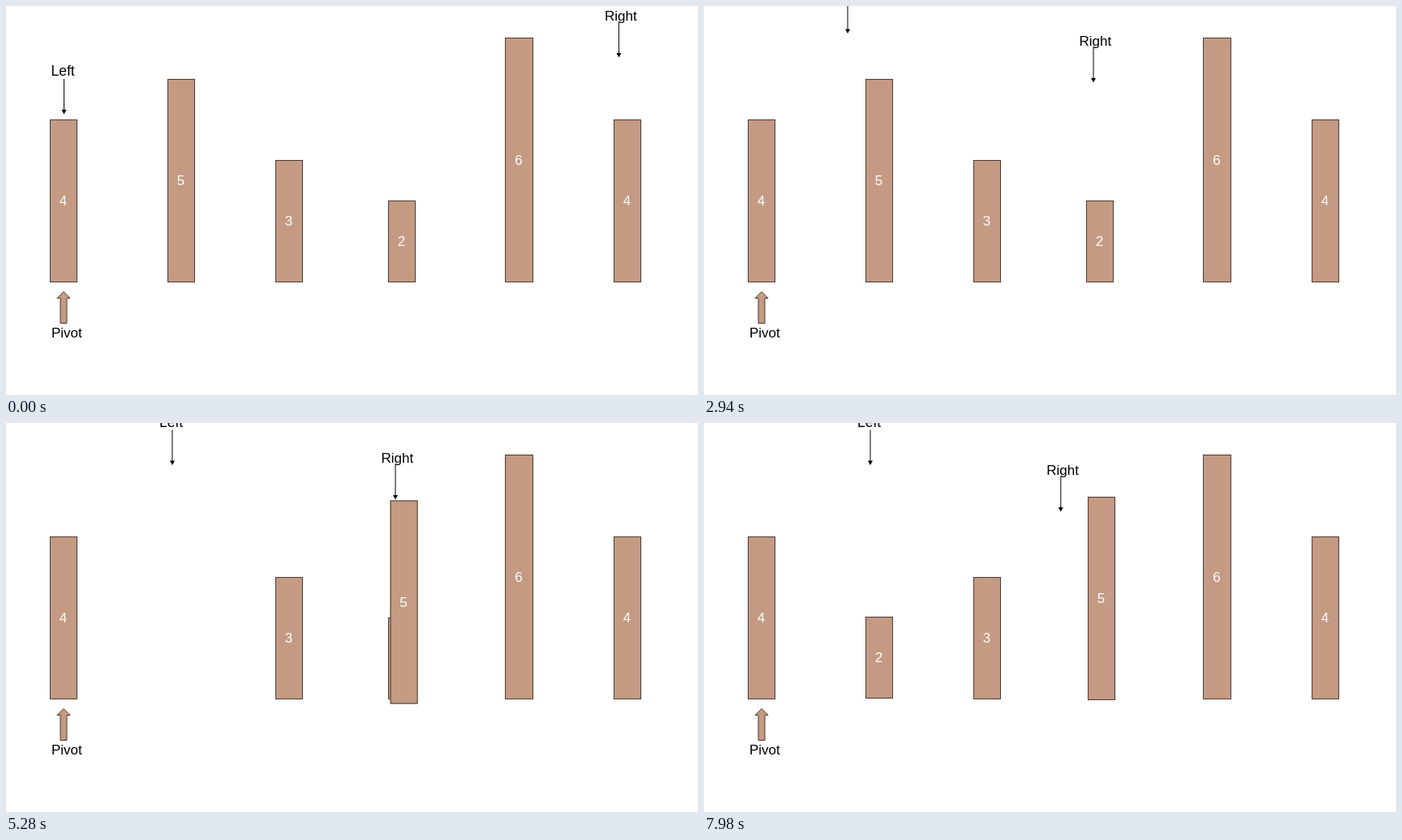
These frames come from a looping animation (853 px wide and 480 px high, 8000 ms). An HTML page with a canvas:

```html
<!DOCTYPE html>
<html lang="en">
<head>
<meta charset="utf-8">
<title>Partition step</title>
<style>
  html, body { margin: 0; width: 100%; height: 100%; overflow: hidden; background: #fff; }
  canvas { display: block; }
</style>
</head>
<body>
<canvas id="stage" width="853" height="480"></canvas>
<script>
const ctx = document.getElementById('stage').getContext('2d');
const LOOP = 8000, STEP = 60;
const FILL = '#c49a83', EDGE = '#4a3a34', INK = '#000';
const FONT = '"Liberation Sans", Arial, sans-serif';

const ease = u => u < 0.5 ? 0.5 * (2 * u) ** 2.7 : 1 - 0.5 * (2 - 2 * u) ** 2.7;

// Offset along a cubic curve from (0,0), eased by arc length.
function move(start, duration, x1, y1, x2, y2, x3, y3) {
  const N = 200, points = [[0, 0, 0]];
  for (let i = 1; i <= N; i++) {
    const t = i / N, a = 3 * t * (1 - t) ** 2, b = 3 * t * t * (1 - t), c = t ** 3;
    const x = a * x1 + b * x2 + c * x3, y = a * y1 + b * y2 + c * y3;
    const [px, py, len] = points[i - 1];
    points.push([x, y, len + Math.hypot(x - px, y - py)]);
  }
  const total = points[N][2];
  return time => {
    const u = (time - start) / duration;
    if (u <= 0) return [0, 0];
    if (u >= 1) return [x3, y3];
    const s = ease(u) * total;
    const i = Math.max(1, points.findIndex(p => p[2] >= s));
    const p = points[i - 1], q = points[i];
    const k = (s - p[2]) / (q[2] - p[2]);
    return [p[0] + k * (q[0] - p[0]), p[1] + k * (q[1] - p[1])];
  };
}

const rightFirst = move(-60, 1860, -55, -60, -230, -60, -275.5, 31);
const leftHop = move(1710, 1880, 30, -58, 95, -135, 133.5, -81.5);
const fiveSwap = move(3606, 1880, 0, 268, 310, 268, 274, 1);
const twoSwap = move(5358, 1985, 0, 179, -226, 179, -272, -1);
const rightSecond = move(7110, 1900, -34, 12.7, -68, 25.3, -102, 38);

function text(str, x, y, size, color, align) {
  ctx.font = `${size}px ${FONT}`;
  ctx.fillStyle = color;
  ctx.textAlign = align;
  ctx.fillText(str, x, y);
}

function bar(value, x, top, width = 34, [dx, dy] = [0, 0]) {
  const height = 341 - top;
  x += dx;
  top += dy;
  ctx.fillStyle = FILL;
  ctx.fillRect(x, top, width, height);
  ctx.strokeStyle = EDGE;
  ctx.lineWidth = 1;
  ctx.strokeRect(x + 0.5, top + 0.5, width - 1, height - 1);
  text(value, x + width / 2 - 0.5, top + height / 2 + 5.5, 17, '#fff', 'center');
}

// Label with a thin arrow below it; x and y mark the arrow tip.
function pointer(label, x, y, size, labelDx, labelDy) {
  text(label, x + labelDx, y + labelDy, size, INK, 'left');
  ctx.strokeStyle = ctx.fillStyle = INK;
  ctx.lineWidth = 1;
  ctx.beginPath();
  ctx.moveTo(x, y - 43);
  ctx.lineTo(x, y - 4);
  ctx.stroke();
  ctx.beginPath();
  ctx.moveTo(x - 3, y - 5);
  ctx.lineTo(x + 3, y - 5);
  ctx.lineTo(x, y + 0.5);
  ctx.fill();
}

function pivot() {
  const half = [[0, 352.5], [8, 360.5], [4, 360.5], [4, 391.5]];
  ctx.beginPath();
  half.forEach(([x, y]) => ctx.lineTo(71 + x, y));
  half.reverse().forEach(([x, y]) => ctx.lineTo(71 - x, y));
  ctx.closePath();
  ctx.fillStyle = FILL;
  ctx.fill();
  ctx.strokeStyle = EDGE;
  ctx.lineWidth = 1;
  ctx.stroke();
  text('Pivot', 56, 409, 17, INK, 'left');
}

function draw(time) {
  ctx.fillStyle = '#fff';
  ctx.fillRect(0, 0, 853, 480);
  bar('4', 54, 140);
  bar('3', 332, 190);
  bar('6', 615, 39, 35);
  bar('4', 749, 140);
  bar('2', 471, 240, 34, twoSwap(time));
  bar('5', 199, 90, 34, fiveSwap(time));
  pivot();
  const [lx, ly] = leftHop(time);
  pointer('Left', 71.5 + lx, 133 + ly, 17.5, -16, -47);
  const [ax, ay] = rightFirst(time), [bx, by] = rightSecond(time);
  pointer('Right', 755.5 + ax + bx, 63 + ay + by, 17, -17.5, -45);
}

const begin = performance.now();
function tick() {
  const time = (performance.now() - begin) % LOOP;
  draw(Math.floor(time / STEP) * STEP);
  requestAnimationFrame(tick);
}
tick();
</script>
</body>
</html>
```
